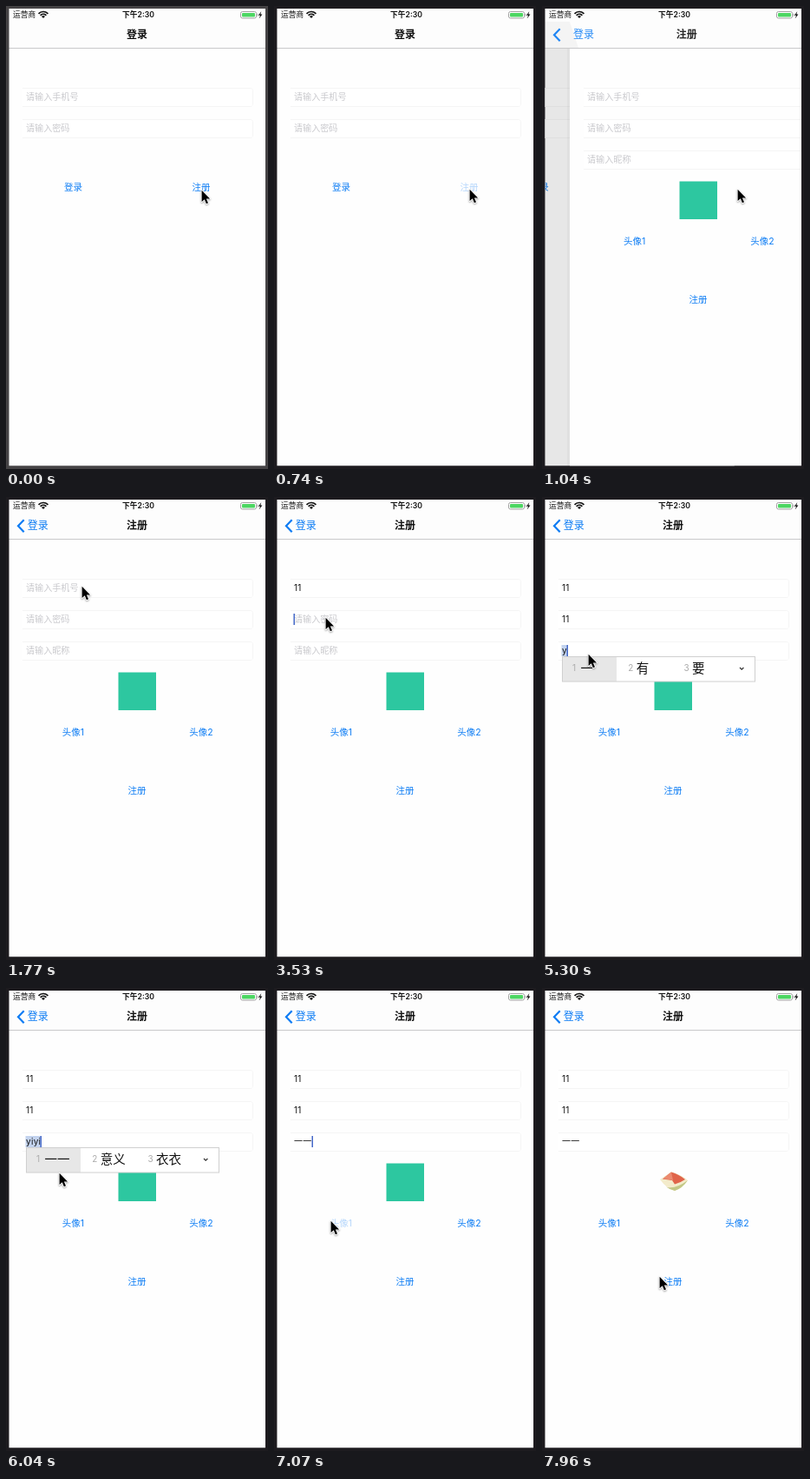
Recreate the animation shown at these times as an HTML page with a canvas. Size 302 by 532 pixels, loop 8 s.

```html
<!DOCTYPE html>
<html lang="zh-CN">
<head>
<meta charset="utf-8">
<title>登录与注册</title>
<style>
html, body { margin: 0; height: 100%; overflow: hidden; }
canvas { display: block; width: 302px; height: 532px; }
</style>
</head>
<body>
<canvas id="stage"></canvas>
<script>
const canvas = document.getElementById('stage');
const ctx = canvas.getContext('2d');
const ratio = window.devicePixelRatio || 1;
canvas.width = 302 * ratio;
canvas.height = 532 * ratio;

const LOOP = 8000, STEP = 147.2, LEAD = 10;
const BLUE = '#0c7cf4', INK = '#111', HINT = '#c9c9cd';
const FONT = 'Inter, "Noto Sans CJK SC", "Noto Sans CJK", sans-serif';
const BASELINE_SHIFT = 0.8;
const FIELD_Y = [94, 130, 166];
const HINTS = ['请输入手机号', '请输入密码', '请输入昵称'];

// Pointer stops: step, x, y
const POINTER = [
  [0, 225, 211], [1, 225, 210], [8, 225, 210], [12, 87, 102], [18, 87, 102],
  [24, 59, 138], [26, 59, 138], [28, 54, 199], [30, 53, 180], [40, 53, 180],
  [41, 61, 212], [42, 61, 212], [46, 65, 267], [49, 65, 267], [54, 135, 331]
];
// Input method suggestions by number of typed letters
const CANDIDATES = [[], ['一', '有', '要'], ['一', '以', '已'], ['意义', '一样', '医院'], ['一一', '意义', '衣衣']];

const lerp = (a, b, k) => a + (b - a) * k;

function rect(x, y, w, h, color) {
  ctx.fillStyle = color;
  ctx.fillRect(x, y, w, h);
}

function text(str, x, y, size, color, { align = 'left', weight = 400, alpha = 1, spacing = 0 } = {}) {
  ctx.save();
  ctx.globalAlpha *= alpha;
  ctx.font = `${weight} ${size}px ${FONT}`;
  ctx.letterSpacing = `${spacing}px`;
  ctx.textAlign = align;
  ctx.textBaseline = 'middle';
  ctx.fillStyle = color;
  ctx.fillText(str, x, y + BASELINE_SHIFT);
  const { width } = ctx.measureText(str);
  ctx.restore();
  return width;
}

function shape(d, fill, stroke, width = 1) {
  const path = new Path2D(d);
  if (stroke) {
    ctx.strokeStyle = stroke;
    ctx.lineWidth = width;
    ctx.stroke(path);
  }
  if (fill) {
    ctx.fillStyle = fill;
    ctx.fill(path);
  }
}

function roundBox(x, y, w, h, r, fill, stroke) {
  ctx.beginPath();
  ctx.roundRect(x, y, w, h, r);
  if (fill) { ctx.fillStyle = fill; ctx.fill(); }
  if (stroke) { ctx.strokeStyle = stroke; ctx.lineWidth = 1; ctx.stroke(); }
}

const button = (str, x, y, pressed) =>
  text(str, x, y, 10.5, BLUE, { align: 'center', alpha: pressed ? 0.3 : 1 });

function field(i, value = '', caret = false, composing = false) {
  const y = FIELD_Y[i];
  shape(`M19 ${y + 0.5}H281Q284.5 ${y + 0.5} 284.5 ${y + 4}V${y + 18}Q284.5 ${y + 21.5} 281 ${y + 21.5}H19`, '#fff', '#ebebeb');
  const drawValue = () => text(value, 23, y + 10.5, 10, INK, { spacing: 0.3 });
  const end = 23 + (value ? drawValue() : 0);
  if (composing) {
    rect(22.5, y + 4, end - 22.5, 13, '#c3d3ee');
    drawValue();
  }
  if (!value) text(HINTS[i], 23, y + 10.5, 10.1, HINT);
  if (caret) rect(Math.round(end) - 0.5, y + 4, 1.5, 13, '#4468c8');
}

function loginPage(s) {
  rect(0, 49, 302, 483, '#fefefe');
  field(0);
  field(1);
  button('登录', 77.5, 208);
  button('注册', 225, 208, s === 5);
}

function melon() {
  shape('M136 220Q143 215 149 211.5Q160 214 168 221Q162 230 153 233Q143 230 136 220Z', '#f3ebcb');
  shape('M168 221Q162 230 153 233Q147 231.5 143 228.5Q153 232 168 221Z', '#c3c886');
  shape('M139 219.5L149 211.5Q158 214 165 220Q159 224 153 225.5L150 221Z', '#e0644a');
  shape('M139 219.5L149 211.5L151 221Q145 219 139 219.5Z', '#eb8a70');
}

function typed(s, from) {
  return '11'.slice(0, Math.max(0, s - from + 1));
}

function registerPage(s) {
  rect(0, 49, 302, 483, '#fefefe');
  const letters = Math.min(4, Math.max(0, s - 35));
  const composing = letters > 0 && s < 42;
  const pinyin = 'yiyi'.slice(0, letters);
  field(0, typed(s, 17), s >= 15 && s < 24 && s !== 21);
  field(1, typed(s, 25), s >= 24 && s < 30 && s !== 28);
  field(2, s < 42 ? pinyin : '一一', s >= 30 && s < 51 && s !== 33, composing);
  if (s < 49) rect(129.5, 201.5, 43.5, 43.5, '#2dc7a0');
  else melon();
  button('头像1', 77.5, 270, s === 48);
  button('头像2', 225, 270);
  button('注册', 151, 337);
  if (composing) candidates(CANDIDATES[letters]);
}

function candidates(words) {
  rect(23, 183, 223, 29, '#fff');
  rect(23, 183, 63, 29, '#e7e7e7');
  ctx.strokeStyle = '#d0d0d0';
  ctx.lineWidth = 1;
  ctx.strokeRect(23.5, 183.5, 222, 28.5);
  words.forEach((word, i) => {
    const x = 35 + i * 64.3;
    text(i + 1, x, 196.5, 10, '#ababab');
    text(word, x + 9.5, 196.5, 14.5, INK);
  });
  shape('M228 196L230.2 198.2L232.4 196', null, '#333', 1.2);
}

function statusBar() {
  text('运营商', 8, 9.6, 8.7, INK);
  for (const r of [7.5, 4.6]) {
    ctx.beginPath();
    ctx.arc(43, 14, r, -Math.PI * 0.76, -Math.PI * 0.24);
    ctx.strokeStyle = INK;
    ctx.lineWidth = 1.7;
    ctx.stroke();
  }
  shape('M43 14L41 11.9Q43 10.3 45 11.9Z', INK);
  text('下午2:30', 152.5, 9.8, 8.7, INK, { align: 'center', weight: 600 });
  roundBox(270.5, 6.5, 18, 7.5, 2, '#fff', '#a2a2a2');
  roundBox(272, 8, 15, 4.5, 1, '#4cd662');
  rect(289.6, 8.7, 1, 3, '#a2a2a2');
  shape('M294.3 6L291 10.8H293L291.8 14.4L295.4 9.5H293.3Z', INK);
}

function navBar(p) {
  rect(0, 0, 302, 48, '#fdfdfd');
  if (p > 0 && p < 0.98) {
    const edge = 3 + 296 * (1 - p);
    shape(`M3 18H${edge}L${edge + 10} 48H3Z`, `rgba(0,0,0,${0.04 * p})`);
  }
  rect(0, 48, 302, 1, '#c9c9cb');
  const center = { align: 'center' };
  const titleX = lerp(151 + 160, 151, p), backX = lerp(151, 36.7, p);
  if (p < 1) text('登录', backX, 32.7, 12, INK, { ...center, weight: 600, alpha: Math.max(0, 1 - 1.5 * p) });
  if (p > 0) {
    text('登录', backX, 32.7, 12, BLUE, { ...center, alpha: p });
    text('注册', titleX, 32.7, 12, INK, { ...center, weight: 600, alpha: p });
    ctx.globalAlpha = p;
    shape('M20.7 26.2L14 33.2L20.7 40.2', null, BLUE, 2.2);
    ctx.globalAlpha = 1;
  }
  statusBar();
}

// Critically damped push of the second page
function pushProgress(s) {
  const w = 18.26 * Math.max(0, s * STEP - 816) / 1000;
  return s > 8 ? 1 : 1 - (1 + w) * Math.exp(-w);
}

function pointer(s) {
  const i = Math.max(1, POINTER.findIndex(stop => stop[0] >= s));
  const [s0, x0, y0] = POINTER[i - 1], [s1, x1, y1] = POINTER[i];
  const k = (s - s0) / (s1 - s0);
  const ease = k * k * (3 - 2 * k);
  ctx.save();
  ctx.translate(lerp(x0, x1, ease), lerp(y0, y1, ease));
  ctx.lineJoin = 'round';
  ctx.shadowColor = 'rgba(0,0,0,.35)';
  ctx.shadowBlur = 2 * ratio;
  ctx.shadowOffsetY = ratio;
  const arrow = 'M.6 .8V14L3.8 11.2L5.9 16.2L8 15.3L5.9 10.4H10.1Z';
  shape(arrow, null, '#fff', 1.8);
  ctx.shadowColor = 'transparent';
  shape(arrow, '#000');
  ctx.restore();
}

function draw(ms) {
  const s = Math.min(54, Math.floor((ms + LEAD) / STEP));
  const p = pushProgress(s);
  ctx.setTransform(ratio, 0, 0, ratio, 0, 0);
  rect(0, 0, 302, 532, s < 5 ? '#454345' : '#1d1b1f');
  ctx.save();
  ctx.beginPath();
  ctx.rect(3.5, 3, 295.5, 525.3);
  ctx.clip();
  if (p < 1) {
    ctx.save();
    ctx.translate(-89 * p, 0);
    loginPage(s);
    ctx.restore();
    rect(0, 49, 302, 483, p > 0 ? `rgba(0,0,0,${0.1 * p})` : 'transparent');
  }
  if (p > 0) {
    ctx.save();
    ctx.translate(296 * (1 - p), 0);
    if (p < 1) rect(0, 49, 3, 483, 'rgba(0,0,0,.03)');
    ctx.beginPath();
    ctx.rect(3, 0, 302, 532);
    ctx.clip();
    registerPage(s);
    ctx.restore();
  }
  navBar(p);
  ctx.restore();
  pointer(s);
}

function tick() {
  draw(performance.now() % LOOP);
  requestAnimationFrame(tick);
}
tick();
</script>
</body>
</html>
```
